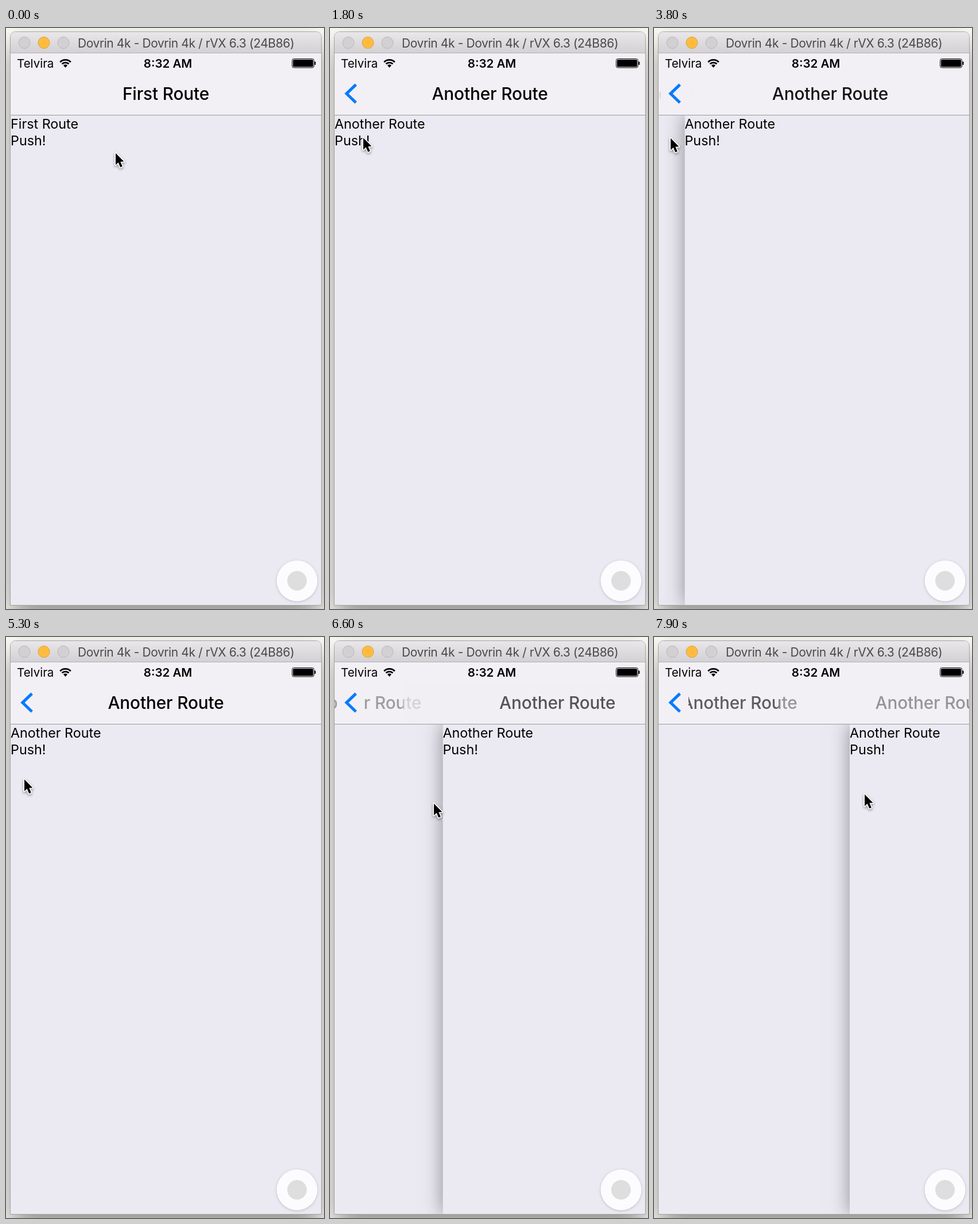
An HTML page with a canvas that plays this animation: 554x1010 px, repeating every 8 s.

```html
<!DOCTYPE html>
<html lang="en">
<head>
<meta charset="utf-8">
<title>Route stack</title>
<style>
  html, body { margin: 0; width: 554px; height: 1010px; overflow: hidden; }
  canvas { display: block; }
</style>
</head>
<body>
<canvas width="554" height="1010"></canvas>
<script>
const ctx = document.querySelector('canvas').getContext('2d');
const LOOP = 8000, STEP = 100;
const LEFT = 8, TOP = 7, RIGHT = 549, BOTTOM = 1003, WIDTH = RIGHT - LEFT;
const BAR = 44, BODY = 152, MID = 278.5;
const HEAD = '#f2f0f5', PAGE = '#ebeaf3';
const TITLE_SHIFT = 338;
const PUSH_1 = 1119, PUSH_2 = 3610, PUSH_TIME = 239;
const DRAG_START = 5300, DRAG_LAG = 50, DRAG_X = 33;

// drift: how far a page slides left while it gets covered
const first = { name: 'First Route', drift: 0.68 };
const another = { name: 'Another Route', drift: 1 };

// pointer stops: time, x, y
const stops = [
  [0, 190, 216], [800, 57, 184], [1400, 57, 184], [1900, 57, 190],
  [2350, 40, 346], [2650, 29, 318], [2900, 28, 218], [3500, 28, 190],
  [4200, 28, 190], [5200, 31, 246], [5300, 31, 246], [6000, 310, 280],
  [6350, 320, 292], [6850, 40, 284], [7200, 320, 280], [7500, 120, 278],
  [7830, 366, 272], [8000, 366, 272]
];

const clamp = v => Math.max(0, Math.min(1, v));
const smooth = u => u * u * (3 - 2 * u);
const inOut = u => u < 0.5 ? 2 * u * u : 1 - 2 * (1 - u) ** 2;

function pointer(t) {
  const i = stops.findIndex(s => s[0] > t);
  const [t0, x0, y0] = stops[i - 1], [t1, x1, y1] = stops[i];
  const u = smooth((t - t0) / (t1 - t0));
  return { x: x0 + (x1 - x0) * u, y: y0 + (y1 - y0) * u };
}

// pages on view and how far the upper one has come in (0 to 1)
function scene(t) {
  if (t < PUSH_1) return { under: null, over: first, p: 1 };
  if (t < PUSH_2)
    return { under: first, over: another, p: inOut(clamp((t - PUSH_1) / PUSH_TIME)) };
  const p = t < DRAG_START
    ? inOut(clamp((t - PUSH_2) / PUSH_TIME))
    : 1 - clamp((pointer(t - DRAG_LAG).x - DRAG_X) / WIDTH);
  return { under: another, over: another, p };
}

function rect(x, y, w, h, fill) {
  ctx.fillStyle = fill;
  ctx.fillRect(x, y, w, h);
}

function text(str, x, y, font, fill = '#000', align = 'left', spacing = '0px') {
  ctx.font = font + ' Inter, sans-serif';
  ctx.fillStyle = fill;
  ctx.textAlign = align;
  ctx.letterSpacing = spacing;
  ctx.fillText(str, x, y);
}

function disc(x, y, r, fill, stroke) {
  ctx.beginPath();
  ctx.arc(x, y, r, 0, Math.PI * 2);
  ctx.fillStyle = fill;
  ctx.fill();
  if (stroke) {
    ctx.strokeStyle = stroke;
    ctx.lineWidth = 1;
    ctx.stroke();
  }
}

function poly(points) {
  ctx.beginPath();
  points.forEach(([x, y]) => ctx.lineTo(x, y));
}

function shadow(color, blur, dy = 0) {
  ctx.shadowColor = color;
  ctx.shadowBlur = blur;
  ctx.shadowOffsetY = dy;
}

function clipped(x, y, w, h, draw) {
  ctx.save();
  ctx.beginPath();
  ctx.rect(x, y, w, h);
  ctx.clip();
  draw();
  ctx.restore();
}

function drawWindow() {
  rect(0, 0, 554, 1010, '#fffef6');
  ctx.save();
  shadow('rgba(0,0,0,.45)', 50, 22);
  ctx.beginPath();
  ctx.roundRect(LEFT - 0.5, TOP - 0.5, WIDTH + 1, BOTTOM - TOP + 1, [9, 9, 0, 0]);
  ctx.fillStyle = PAGE;
  ctx.fill();
  ctx.restore();
  ctx.strokeStyle = '#a5a4a6';
  ctx.lineWidth = 1;
  ctx.stroke();
  const bar = ctx.createLinearGradient(0, TOP, 0, BAR);
  bar.addColorStop(0, '#e9e7e9');
  bar.addColorStop(1, '#d2d0d2');
  ctx.beginPath();
  ctx.roundRect(LEFT, TOP, WIDTH, BAR - TOP, [8, 8, 0, 0]);
  ctx.fillStyle = bar;
  ctx.fill();
  rect(LEFT, BAR - 1, WIDTH, 1, '#b3b1b3');
  disc(32, 25.5, 10, '#d2d0d2', '#b9b7b9');
  disc(66, 25.5, 10, '#fdbc40', '#dfa038');
  disc(100, 25.5, 10, '#d2d0d2', '#b9b7b9');
  text('Dovrin 4k - Dovrin 4k / rVX 6.3 (24B86)', 125, 33.5, '21px', '#4a484a', 'left', '-0.4px');
}

function drawStatus() {
  text('Telvira', 19, 69, '20.5px');
  text('8:32 AM', 282, 69, '600 20.5px', '#000', 'center');
  // signal fan
  ctx.strokeStyle = '#000';
  ctx.lineWidth = 2.8;
  for (const r of [13.2, 8.4]) {
    ctx.beginPath();
    ctx.arc(103.5, 68.5, r, -Math.PI * 0.75, -Math.PI * 0.25);
    ctx.stroke();
  }
  ctx.beginPath();
  ctx.moveTo(103.5, 69);
  ctx.arc(103.5, 68.5, 5, -Math.PI * 0.75, -Math.PI * 0.25);
  ctx.fillStyle = '#000';
  ctx.fill();
  // battery
  ctx.lineWidth = 1;
  ctx.beginPath();
  ctx.roundRect(498.5, 53.5, 38, 15.5, 3);
  ctx.stroke();
  ctx.beginPath();
  ctx.roundRect(500, 55, 35, 12.5, 1.5);
  ctx.roundRect(537.5, 58.3, 2, 6, 1);
  ctx.fill();
}

function drawTitle(page, shift, alpha) {
  ctx.globalAlpha = alpha;
  text(page.name, MID + shift, 124.5, '500 29.7px', '#000', 'center', '-0.1px');
  ctx.globalAlpha = 1;
}

function drawHeader({ under, over, p }) {
  rect(LEFT, BAR, WIDTH, BODY - BAR, HEAD);
  if (under && p < 1) drawTitle(under, -TITLE_SHIFT * p, 1 - p);
  const shift = TITLE_SHIFT * (1 - p);
  ctx.globalAlpha = p;
  rect(10 + shift, 78, WIDTH, BODY - 80, HEAD);
  drawTitle(over, shift, p);
  if (under) {
    rect(12, 78, 48, BODY - 80, HEAD);
    poly([[45.2, 98.4], [28.8, 114.1], [45.2, 129.8]]);
    ctx.strokeStyle = '#007aff';
    ctx.lineWidth = 5;
    ctx.stroke();
  }
  drawStatus();
  rect(LEFT, BODY - 1, WIDTH, 1, '#9a999e');
}

function drawPage(page, x) {
  ctx.save();
  shadow('rgba(0,0,0,.4)', 32);
  rect(x, BODY, WIDTH, BOTTOM - BODY, PAGE);
  ctx.restore();
  text(page.name, x, 175, '23.3px');
  text('Push!', x, 203.7, '23.3px');
}

function drawPages({ under, over, p }) {
  if (under && p < 1) drawPage(under, LEFT - WIDTH * p * under.drift);
  drawPage(over, LEFT + WIDTH * (1 - p));
}

function drawButton() {
  ctx.save();
  shadow('rgba(0,0,0,.2)', 4, 1);
  disc(507, 961, 35.5, '#fcfbfe');
  ctx.restore();
  disc(507, 961, 17, '#dedede');
}

function drawPointer({ x, y }) {
  ctx.save();
  ctx.translate(x, y);
  poly([[1, 1.5], [1, 22], [5.6, 17.8], [9.2, 26], [12.8, 24.4], [9.3, 16.6], [15.5, 16.2]]);
  ctx.closePath();
  ctx.lineJoin = 'round';
  ctx.lineWidth = 3.4;
  ctx.strokeStyle = '#fff';
  shadow('rgba(0,0,0,.4)', 4, 2);
  ctx.stroke();
  shadow('transparent', 0);
  ctx.fillStyle = '#000';
  ctx.fill();
  ctx.restore();
}

function frame() {
  const t = Math.floor(performance.now() % LOOP / STEP) * STEP;
  const now = scene(t);
  drawWindow();
  clipped(LEFT, BODY, WIDTH, BOTTOM - BODY, () => drawPages(now));
  clipped(LEFT, BAR, WIDTH, BODY - BAR, () => drawHeader(now));
  drawButton();
  drawPointer(pointer(t));
  requestAnimationFrame(frame);
}
frame();
</script>
</body>
</html>
```
